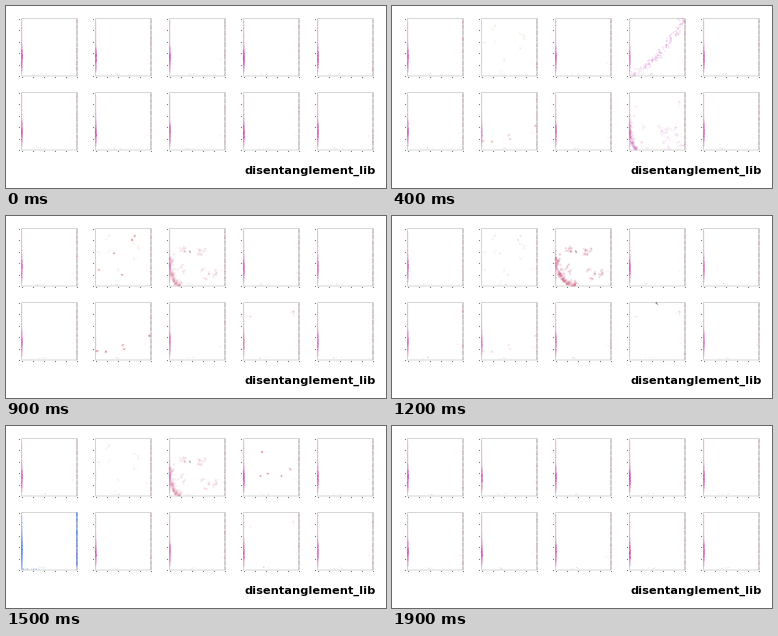
Animation of 380 by 182 pixels, one loop 2 s. Source, as a matplotlib script:

```python
import itertools

import matplotlib.pyplot as plt
import numpy as np
from matplotlib.animation import FuncAnimation
from matplotlib.colors import to_rgb
from matplotlib.patches import Rectangle

W, H, DPI = 380, 182, 100
STEPS, STEP_MS = 20, 100
LOOP = STEPS * STEP_MS
PX = 72 / DPI          # points per pixel
PW, PH = 56, 58        # panel size
CELLS = list(itertools.product(range(2), range(5)))

MAGENTA, PINK, ROSE, RED = "#c033ad", "#d973b4", "#cf5f82", "#c4524f"
OLIVE, BLUE, DARK = "#b9b070", "#3f78d8", "#333333"


def origin(cell):
    return np.array([15 + 74 * cell[1], 12 + 74 * cell[0]])


def layer(x, y, color, alpha, size):
    """Samples in panel coordinates: positions, colours, diameters."""
    xy = np.clip(np.c_[x, y], .5, [PW - .2, PH - .3])
    n = len(xy)
    rgba = np.c_[np.broadcast_to(color, (n, 3)),
                 np.clip(np.broadcast_to(alpha, n), 0, 1)]
    return xy, rgba, np.broadcast_to(size, n)


def streak(rng, level, tint, mix):
    """Dense column of samples along the left axis."""
    y = np.arange(3, 55, 1.0)
    tones = np.array([to_rgb(c) for c in (MAGENTA, PINK, ROSE)])
    rgb = tones[rng.choice(3, y.size, p=[.6, .2, .2])]
    rgb = rgb * (1 - mix) + np.array(to_rgb(tint)) * mix
    alpha = .08 + .7 * np.exp(-((y - 40) / 9) ** 2)
    alpha *= level * rng.uniform(.6, 1, y.size)
    return layer(.9 + rng.uniform(-.2, .3, y.size), y, rgb, alpha, 1.9)


def specks(rng):
    """Sparse samples near the right and bottom axes."""
    yield layer(np.full(18, PW), rng.uniform(3, 54, 18), to_rgb(ROSE),
                rng.uniform(.05, .3, 18), 1.3)
    yield layer(rng.uniform(16, 26, 5), rng.uniform(55, 57, 5),
                to_rgb("gray"), .15, 1.2)
    yield layer(rng.uniform(50, 55, 2), rng.uniform(41, 46, 2),
                to_rgb(PINK), .15, 1.2)


def clusters(rng, level, color, points, each=5, spread=.6, size=1.5):
    x, y = np.repeat(np.array(points, float), each, axis=0).T
    n = x.size
    return layer(x + rng.normal(0, spread, n), y + rng.normal(0, spread, n),
                 to_rgb(color), level * rng.uniform(.12, .4, n), size)


def spots(rng, level, color, points):
    yield clusters(rng, level, color, points)


def haze(rng, level, color, count):
    """Barely visible clusters anywhere in the panel."""
    points = rng.uniform([3, 8], [54, 56], (count, 2))
    yield clusters(rng, .4 * level, color, points, spread=1.2)


def corner(rng, level, color, top):
    """Samples hugging the left and bottom axes, with loose clumps."""
    u = rng.random(110)
    x = 20 * level * u ** 2 + rng.exponential(1.5, u.size)
    y = PH - 30 * (1 - u) ** 2 - rng.exponential(1.8, u.size)
    yield layer(x, y, to_rgb(color), level * rng.uniform(.1, .35, u.size), 2.4)
    points = np.c_[rng.uniform(10, 54, 14), rng.uniform(top, 56, 14)]
    yield clusters(rng, .7 * level, color, points, 7, 1.3, 1.9)


def diagonal(rng, level, color, bend):
    """Winding band from the lower left to the upper right."""
    u = np.linspace(.02, 1, 150)
    x = PW * u + .8 * np.sin(31 * u)
    y = PH - 1 - PW * u ** bend
    wide = .6 + 2 * (1 - level)
    alpha = level * rng.uniform(.25, .55, u.size)
    alpha[u < .28] *= .5
    yield layer(x + rng.normal(0, wide, u.size), y + rng.normal(0, wide, u.size),
                to_rgb(color), alpha, 1.7)


def rim(rng, level, color, count):
    """Recoloured samples along both side axes."""
    y = np.linspace(4, 57, count)
    fade = .12 + .5 * np.exp(-((y - 38) / 14) ** 2)
    yield layer(np.full(count, .9), y, to_rgb(color), level * fade, 1.9)
    yield layer(np.full(count, PW), y - 3, to_rgb(color),
                level * rng.uniform(.2, .6, count), 1.7)
    yield layer(rng.uniform(1, 18, 12), np.full(12, 57), to_rgb(color),
                .25 * level, 1.4)


# panel, shape, colour, shape parameter, (start, full, hold, end), streak loss
EVENTS = [
    ((0, 1), haze, OLIVE, 9, (0, 200, 1500, 1950), .93),
    ((0, 1), spots, RED, [(37, 12), (40, 8), (19, 25), (27, 47), (4, 42)],
     (500, 900, 900, 1300), 0),
    ((0, 2), corner, ROSE, 8, (600, 1200, 1200, 1800), .6),
    ((0, 2), spots, DARK, [(21, 24)], (600, 1000, 1400, 1800), 0),
    ((0, 3), diagonal, MAGENTA, 1.57, (250, 600, 600, 850), 1),
    ((0, 3), spots, ROSE, [(19, 14), (17, 38), (25, 36), (39, 38), (47, 31)],
     (1200, 1500, 1500, 1800), 0),
    ((1, 0), rim, BLUE, 55, (1300, 1500, 1500, 1700), 1),
    ((1, 1), spots, RED, [(2, 49), (28, 43), (29, 47), (11, 50), (55, 34)],
     (150, 600, 900, 1300), .9),
    ((1, 3), corner, MAGENTA, 34, (0, 200, 200, 500), .95),
    ((1, 3), haze, RED, 3, (200, 600, 900, 1900), .3),
    ((1, 3), spots, DARK, [(28, 1)], (950, 1200, 1200, 1450), .9),
]


def samples(step):
    t = step * STEP_MS
    parts = []
    for k, cell in enumerate(CELLS):
        level = .88 + .12 * np.cos(2 * np.pi * t / LOOP)
        tint, mix = MAGENTA, 0
        shapes = list(specks(np.random.default_rng(100 * step + k)))
        for j, (place, shape, color, arg, times, loss) in enumerate(EVENTS):
            amount = np.interp(t, times, (0, 1, 1, 0))
            if place != cell or amount == 0:
                continue
            shapes += shape(np.random.default_rng(70 + j), amount, color, arg)
            level *= 1 - loss * amount
            if shape is haze:
                tint, mix = color, .8 * amount
        shapes.append(streak(np.random.default_rng(40 + k), level, tint, mix))
        parts += [(xy + origin(cell), rgba, d) for xy, rgba, d in shapes]
    xy, rgba, d = (np.concatenate(p) for p in zip(*parts))
    return xy, rgba, (d * PX) ** 2


fig = plt.figure(figsize=(W / DPI, H / DPI), dpi=DPI, facecolor="white")
ax = fig.add_axes([0, 0, 1, 1])
ax.set(xlim=(0, W), ylim=(H, 0))
ax.axis("off")

ticks = np.linspace(0, 1, 6)
for cell in CELLS:
    x, y = origin(cell)
    ax.add_patch(Rectangle((x + .5, y + .5), PW - .5, PH - .5, fill=False,
                           ec="#d6d6d2", lw=PX, snap=False, zorder=1))
    ax.plot([x + PW, x + PW], [y + .5, y + PH], color="#c2bebc",
            lw=1.2 * PX, ls=(0, (4, 1)), snap=False, zorder=1)
    marks = np.r_[np.c_[np.full(6, x - 2.2), y + .5 + ticks * (PH - .5)],
                  np.c_[x + .5 + ticks * (PW - .5), np.full(6, y + PH + 1.2)]]
    ax.scatter(*marks.T, s=(1.2 * PX) ** 2, color="#444444", alpha=.75,
               lw=0, snap=False, zorder=2)

ax.text(370, 168, "disentanglement_lib", ha="right", va="baseline",
        family="DejaVu Sans", weight="bold", size=11.4 * PX, color="black")

dots = ax.scatter([], [], lw=0, zorder=3)


def update(step):
    xy, rgba, sizes = samples(step)
    dots.set_offsets(xy)
    dots.set_facecolors(rgba)
    dots.set_sizes(sizes)
    return (dots,)


anim = FuncAnimation(fig, update, frames=STEPS, interval=STEP_MS,
                     init_func=lambda: update(0), repeat=True, repeat_delay=0)
plt.show()
```
